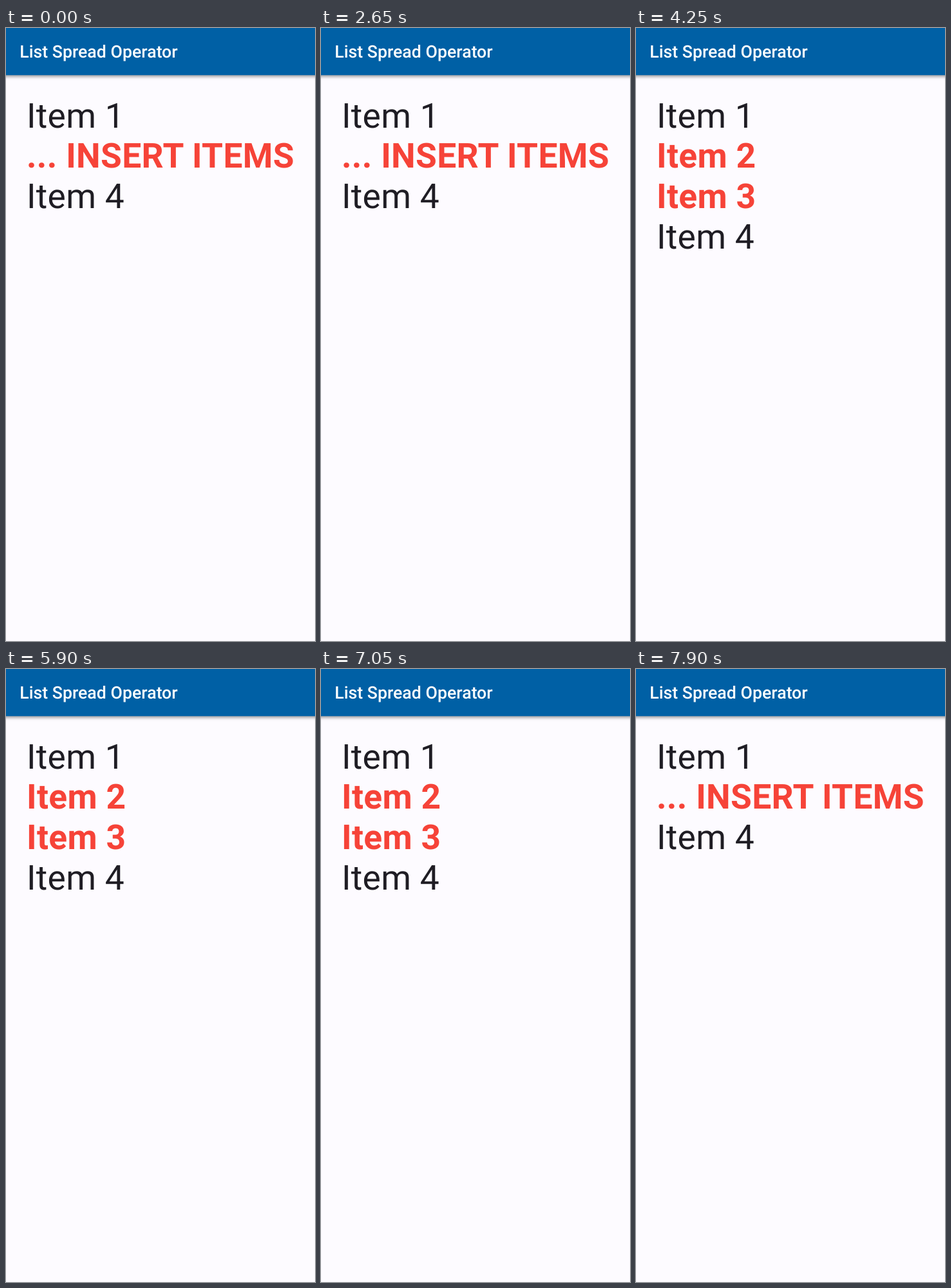
Recreate the animation shown at these times as an HTML page. Size 480 by 953 pixels, loop 8000 ms.

```html
<!DOCTYPE html>
<html lang="en">
<head>
<meta charset="utf-8">
<title>List Spread Operator</title>
<style>
html, body { margin: 0; width: 100%; height: 100%; overflow: hidden; background: #fdfbff; }
svg { display: block; width: 480px; height: 953px; font-family: Roboto, sans-serif; }
text { font-size: 53.33px; letter-spacing: .33px; fill: #1f1d24; text-rendering: geometricPrecision; }
.bar { fill: #0060a5; filter: drop-shadow(0 2px 2.5px rgba(0, 0, 0, .35)) drop-shadow(0 2px 2.5px rgba(0, 0, 0, .1)); }
.title { font-size: 26.67px; font-weight: 500; letter-spacing: 0; fill: #fff; }
.new { fill: #f64338; font-weight: 700; }
</style>
</head>
<body>
<svg viewBox="0 0 480 953">
  <rect class="bar" x="-20" y="-20" width="520" height="93.3"/>
  <text class="title" x="21.3" y="46">List Spread Operator</text>
  <text x="32" y="155">Item 1</text>
  <text class="new" id="marker" x="32" y="217.3">... INSERT ITEMS</text>
  <g id="inserted">
    <text class="new" x="32" y="217.3">Item 2</text>
    <text class="new" x="32" y="280">Item 3</text>
  </g>
  <text id="last" x="32">Item 4</text>
</svg>
<script>
const LOOP = 8000, OPEN = 2800, CLOSE = 7250;
const [marker, inserted, last] = ['marker', 'inserted', 'last'].map(id => document.getElementById(id));

function draw() {
  const t = performance.now() % LOOP;
  const open = t >= OPEN && t < CLOSE;
  marker.style.display = open ? 'none' : '';
  inserted.style.display = open ? '' : 'none';
  last.setAttribute('y', open ? 342.7 : 280);
  requestAnimationFrame(draw);
}
draw();
</script>
</body>
</html>
```
